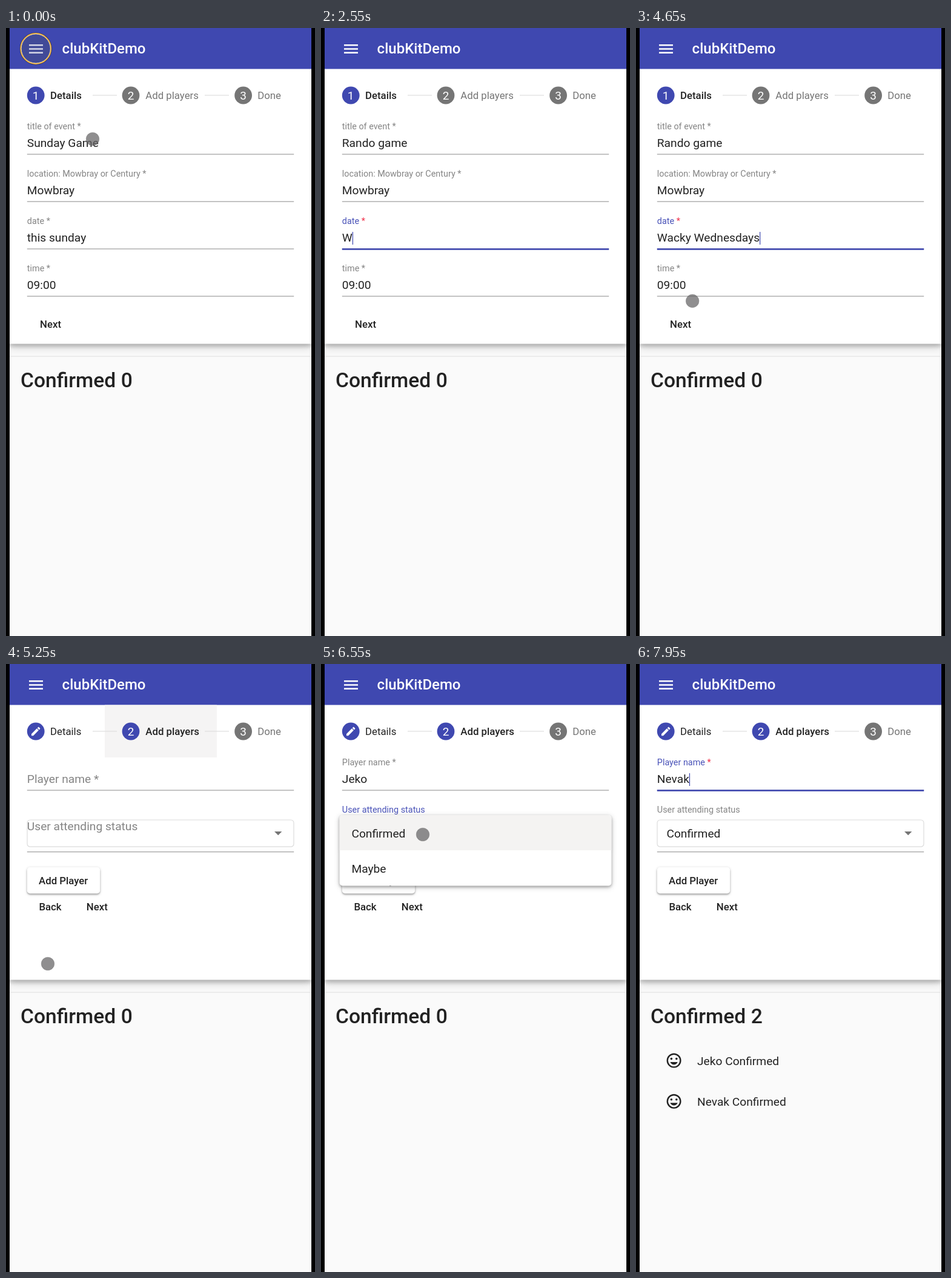
An HTML page that plays this animation: 510x1002 px, repeating every 8 s.

```html
<!DOCTYPE html>
<html lang="en">
<head>
<meta charset="utf-8">
<title>Team form</title>
<style>
  html, body { margin: 0; width: 100%; height: 100%; overflow: hidden; background: #000; }
  svg { display: block; width: 510px; height: 1002px; font-family: Roboto, "Liberation Sans", sans-serif; }
  text { fill: #222; font-size: 19.2px; white-space: pre; }
  .step { font-size: 16.8px; }
  .bold { font-size: 16.8px; font-weight: 500; }
  .num { fill: #fff; font-size: 19px; text-anchor: middle; }
  .soft { fill: #757575; }
  .label { fill: #858585; }
  .focus .label { fill: #4a53b8; }
  .focus .star { fill: #f0304a; }
  .line { fill: #949494; }
  .glow { fill: #3f48b0; transform-box: fill-box; transform-origin: center; }
  .caret { fill: #3f48b0; }
  .card { fill: #fff; filter: drop-shadow(0 4px 3px rgba(0,0,0,.2)) drop-shadow(0 5px 7px rgba(0,0,0,.17)); }
  .raised { fill: #fff; filter: drop-shadow(0 2px 1px rgba(0,0,0,.24)) drop-shadow(0 1px 2px rgba(0,0,0,.2)); }
  .menu { filter: drop-shadow(0 2px 2px rgba(0,0,0,.28)) drop-shadow(0 2px 4px rgba(0,0,0,.2)); }
</style>
</head>
<body>
<svg viewBox="0 0 510 1002">
  <defs>
    <clipPath id="page"><rect x="6" width="498" height="1002"/></clipPath>
    <g id="face" fill="#222">
      <circle r="10.8" fill="none" stroke="#222" stroke-width="2.4"/>
      <circle cx="-4.2" cy="-3" r="1.8"/><circle cx="4.2" cy="-3" r="1.8"/>
      <path d="M-6.1 2.4H6.1C5.2 4.9 2.8 6.6 0 6.6S-5.2 4.9-6.1 2.4z"/>
    </g>
  </defs>
  <rect width="510" height="1002"/>
  <g clip-path="url(#page)">
    <rect x="6" width="498" height="1002" fill="#fafafa"/>
    <rect class="card" x="6" y="60" width="498" height="460.5"/>
    <rect x="6" y="541" width="498" height="461" fill="#fafafa"/>
    <rect x="6" y="540.5" width="498" height="1.2" fill="#e4e4e4"/>
    <text id="count" x="24" y="592" style="font-size:33.6px;font-weight:500"></text>
    <g id="row1"><use href="#face" x="62.6" y="653.6"/><text x="101" y="661">Jeko Confirmed</text></g>
    <g id="row2"><use href="#face" x="62.6" y="720.8"/><text x="101" y="728">Nevak Confirmed</text></g>

    <rect x="6" width="498" height="67.5" fill="#3f48b0"/>
    <g id="ring">
      <circle cx="49.2" cy="34" r="25" fill="#414a98" stroke="#2b2f55" stroke-width="3"/>
      <circle cx="49.2" cy="34" r="25" fill="none" stroke="#f2b13c" stroke-width="1.8"/>
      <circle cx="49.2" cy="34" r="24" fill="none" stroke="#f6ead0" stroke-width=".8"/>
    </g>
    <path id="bars" d="M38 28.3H61M38 34.5H61M38 40.7H61" stroke="#fff" stroke-width="2.4"/>
    <text x="92.6" y="42" style="fill:#fff;font-size:24px;font-weight:500">clubKitDemo</text>

    <rect id="tab" x="163" y="67.5" width="185" height="86.5" fill="#f5f4f4"/>
    <path d="M143 110.8H183M328 110.8H368" stroke="#e0e0e0" stroke-width="1.2"/>
    <circle cx="49.2" cy="111" r="14.4" fill="#3f48b0"/>
    <circle id="dot2" cx="206" cy="111" r="14.4"/>
    <circle cx="391.6" cy="111" r="14.4" fill="#757575"/>
    <text id="one" class="num" x="49.2" y="117.8">1</text>
    <path id="pen" transform="translate(39.6 101.4) scale(.8)" fill="#fff" d="M3 17.25V21h3.75L17.81 9.94l-3.75-3.75L3 17.25zM20.71 7.04c.39-.39.39-1.02 0-1.41l-2.34-2.34c-.39-.39-1.02-.39-1.41 0l-1.83 1.83 3.75 3.75 1.83-1.83z"/>
    <text class="num" x="206" y="117.8">2</text>
    <text class="num" x="391.6" y="117.8">3</text>
    <text id="tab1" x="73" y="116.8">Details</text>
    <text id="tab2" x="230.3" y="116.8">Add players</text>
    <text class="step soft" x="415.2" y="116.8">Done</text>

    <g id="details"><text class="bold" x="56" y="494.3">Next</text></g>
    <g id="players">
      <rect x="35" y="257" width="440" height="44.2" rx="4.8" fill="none" stroke="#dcdcdc" stroke-width="1.2"/>
      <path id="arrow" d="M443 276H455.4L449.2 282.2z" fill="#757575"/>
      <text id="choice" x="50.4" y="285.5">Confirmed</text>
      <rect class="raised" x="34.8" y="335" width="120.4" height="43.2" rx="4.8"/>
      <text class="bold" x="54" y="362.8">Add Player</text>
      <text class="bold" x="54.4" y="406">Back</text>
      <text class="bold" x="132.8" y="406">Next</text>
    </g>
    <g id="menu" class="menu">
      <rect x="30.6" y="249" width="448.8" height="116.5" rx="4.8" fill="#fff"/>
      <path d="M30.6 307V253.8a4.8 4.8 0 0 1 4.8-4.8H474.6a4.8 4.8 0 0 1 4.8 4.8V307z" fill="#f4f3f2"/>
      <text x="50.4" y="285.5">Confirmed</text>
      <text x="50.4" y="343.5">Maybe</text>
    </g>
    <circle id="cursor" r="10.8" fill="#646264" fill-opacity=".72" stroke="#777" stroke-opacity=".4"/>
  </g>
</svg>
<script>
const $ = id => document.getElementById(id);
const NS = "http://www.w3.org/2000/svg";
const LOOP = 8000;
const clamp = v => Math.max(0, Math.min(1, v));
const ease = v => { v = clamp(v); return v * v * (3 - 2 * v); };
const show = (id, on) => $(id).style.display = on ? "" : "none";

function add(parent, tag, attrs, text = "") {
  const el = parent.appendChild(document.createElementNS(NS, tag));
  for (const k in attrs) el.setAttribute(k, attrs[k]);
  el.textContent = text;
  return el;
}

// y is the text row; the underline sits at lineY
function makeField(parent, name, y, lineY = y + 12, star = true) {
  const g = add($(parent), "g", {});
  const label = add(g, "text", { class: "label" }, name);
  if (star) add(label, "tspan", { class: "star" }, " *");
  const value = add(g, "text", { x: 34.8, y });
  add(g, "rect", { class: "line", x: 34.8, y: lineY - .5, width: 440.4, height: 1.1 });
  const glow = add(g, "rect", { class: "glow", x: 34.8, y: lineY - .8, width: 440.4, height: 2.6 });
  const caret = add(g, "rect", { class: "caret", y: y - 16, width: 1.2, height: 21 });

  return (text, { lift = 1, focus = 0, caretOn = false } = {}) => {
    g.setAttribute("class", focus > 0 ? "focus" : "");
    label.setAttribute("transform", `translate(34.8 ${y - 29.4 * lift}) scale(${1 - .25 * lift})`);
    value.textContent = text;
    glow.style.opacity = focus;
    glow.style.transform = `scaleX(${.5 + .5 * focus})`;
    caret.style.display = caretOn ? "" : "none";
    if (caretOn) caret.setAttribute("x", 34.8 + value.getComputedTextLength());
  };
}

const setTitle = makeField("details", "title of event", 196);
const setPlace = makeField("details", "location: Mowbray or Century", 274);
const setDate = makeField("details", "date", 352);
const setTime = makeField("details", "time", 430);
const setName = makeField("players", "Player name", 196);
const setStatus = makeField("players", "User attending status", 274, 309.6, false);

// Erase one word, then type the next
function typed(t, from, to, [e0, e1, w0, w1]) {
  if (t < e1) return from.slice(0, Math.round(from.length * (1 - clamp((t - e0) / (e1 - e0)))));
  return to.slice(0, Math.floor(to.length * clamp((t - w0) / (w1 - w0)) + 1e-6));
}

// Focus from a to b; the caret stays solid while keys are pressed
function focused(t, a, b, keys) {
  if (t < a || t >= b) return {};
  const busy = t >= keys[0] && t <= keys[3];
  const since = t - (t > keys[3] ? keys[3] : a);
  return { focus: clamp((t - a) / 120), caretOn: busy || since % 400 < 200 };
}

const keys = {
  title: [400, 680, 740, 1280],
  date: [2000, 2350, 2420, 3750],
  first: [5800, 5801, 5840, 6040],
  second: [7420, 7540, 7570, 7810]
};

// Pointer: time, x, y
const stops = [
  [0, 143, 183], [250, 138, 190], [1340, 143, 192], [1500, 176, 300], [1720, 150, 346],
  [4300, 150, 346], [4850, 69, 494], [5500, 69, 494], [5680, 110, 192], [6070, 110, 192],
  [6220, 165, 280], [6550, 168, 281], [6680, 168, 281], [6870, 96, 357], [7060, 99, 201]
];
const hidden = [[400, 1340], [2000, 4300], [5800, 6070], [7420, LOOP]];

function movePointer(t) {
  let i = stops.findLastIndex(s => s[0] <= t);
  const a = stops[i], b = stops[i + 1] || a;
  const k = a === b ? 0 : ease((t - a[0]) / (b[0] - a[0]));
  $("cursor").setAttribute("transform", `translate(${a[1] + (b[1] - a[1]) * k} ${a[2] + (b[2] - a[2]) * k})`);
  show("cursor", !hidden.some(([p, q]) => t >= p && t < q));
}

function render(t) {
  const second = t >= 5100;
  show("ring", t < 200);
  $("bars").setAttribute("stroke", t < 200 ? "#d4d6e6" : "#fff");
  show("tab", second && t < 5700);
  show("one", !second);
  show("pen", second);
  $("dot2").setAttribute("fill", second ? "#3f48b0" : "#757575");
  $("tab1").setAttribute("class", second ? "step" : "bold");
  $("tab2").setAttribute("class", second ? "bold" : "step soft");

  show("details", !second);
  setTitle(typed(t, "Sunday Game", "Rando game", keys.title), focused(t, 200, 1750, keys.title));
  setPlace("Mowbray");
  setDate(typed(t, "this sunday", "Wacky Wednesdays", keys.date), focused(t, 1750, 5000, keys.date));
  setTime("09:00");

  show("players", second);
  $("players").setAttribute("transform", `translate(${498 * (1 - ease((t - 5100) / 150))} 0)`);
  const again = t >= 7080;
  const name = again ? typed(t, "Jeko", "Nevak", keys.second) : typed(t, "", "Jeko", keys.first);
  const focus = again ? focused(t, 7080, LOOP, keys.second) : focused(t, 5700, 6250, keys.first);
  setName(name, { lift: ease((t - 5700) / 150), ...focus });
  const picking = t >= 6250 && t < 6890;
  setStatus("", { lift: ease((t - 6250) / 120), focus: picking ? clamp((t - 6250) / 120) : 0 });
  $("arrow").setAttribute("fill", picking ? "#3f48b0" : "#757575");
  show("choice", t >= 6650);

  const open = ease((t - 6250) / 100) * (1 - clamp((t - 6650) / 70));
  show("menu", open > 0);
  $("menu").style.opacity = open;
  const grow = t < 6650 ? .8 + .2 * open : 1;
  $("menu").setAttribute("transform", `translate(0 ${249 * (1 - grow)}) scale(1 ${grow})`);

  const total = (t >= 6930) + (t >= 7860);
  $("count").textContent = "Confirmed " + total;
  show("row1", total > 0);
  show("row2", total > 1);
  movePointer(t);
}

const start = performance.now();
(function tick() {
  render((performance.now() - start) % LOOP);
  requestAnimationFrame(tick);
})();
</script>
</body>
</html>
```
